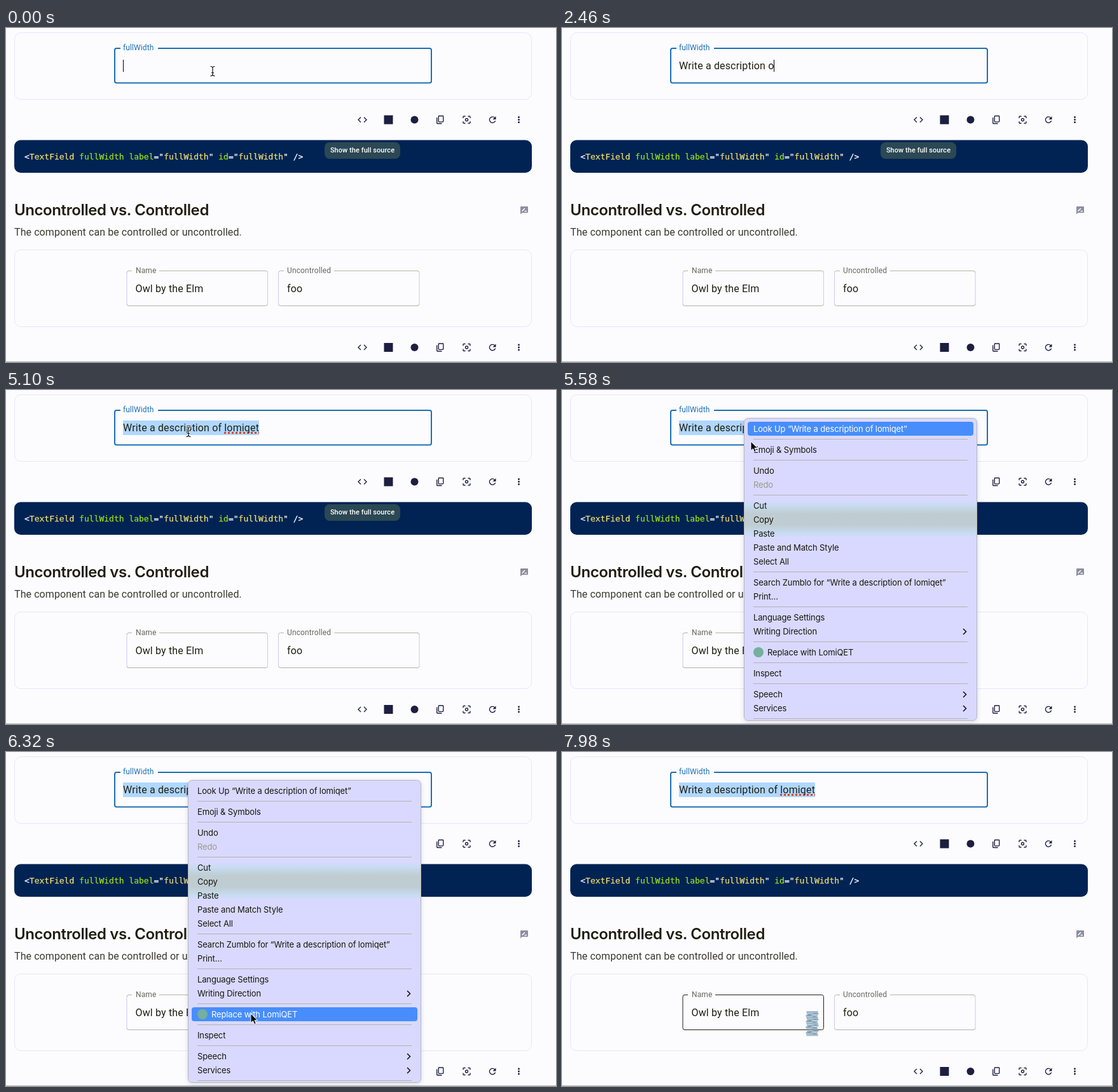
Recreate the animation shown at these times as an HTML page. Size 865 by 526 pixels, loop 8000 ms.

```html
<!DOCTYPE html>
<html lang="en">
<head>
<meta charset="utf-8">
<title>Text field demo</title>
<style>
  html, body { margin: 0; width: 100%; height: 100%; overflow: hidden; background: #fcfcff; }
  body { position: relative; }
  svg { position: absolute; left: 0; top: 0; }
  text { fill: #1f1f10; }
  .body { font: 16px Roboto, sans-serif; letter-spacing: .15px; }
  .intro { letter-spacing: .08px; fill: #3a3a2e; }
  .label { font: 12px Roboto, sans-serif; letter-spacing: .11px; fill: #68685c; }
  .heading { font: 600 24px Inter, sans-serif; letter-spacing: -.4px; }
  .code { font: 13px "DejaVu Sans Mono", monospace; fill: #fff; stroke: #fff; stroke-width: .25px; }
  .tag { fill: #f0e06a; stroke: #f0e06a; }
  .attr { fill: #9be010; stroke: #9be010; }
  .menu text { font: 13px Inter, sans-serif; letter-spacing: -.14px; fill: #16160c; }
  .menu .off { fill: #9a9a8c; }
  .menu .hot { fill: #fff; }
  #input { position: absolute; left: 184px; top: 48px; height: 23px; white-space: pre;
    font: 16px/23px Roboto, sans-serif; letter-spacing: .15px; color: #1f1f10; }
  #input span { display: inline-block; height: 23px; vertical-align: top; }
  #input.picked span { background: #b0d7ff; }
  #input.picked #word { text-decoration: underline dotted #e0402c 2.5px;
    text-underline-offset: 1px; text-decoration-skip-ink: none; }
  #caret { position: absolute; right: -1px; top: 2px; width: 1px; height: 19px; background: #000; }
  #tip { position: absolute; left: 501px; top: 180px; width: 119px; height: 26px; border-radius: 8px;
    background: #2b4854; color: #fff; text-align: center; font: 500 11px/26px Roboto, sans-serif;
    letter-spacing: .05px; }
</style>
</head>
<body>
<svg id="page" width="865" height="526">
  <defs>
    <g id="tools" fill="none" stroke="#1e1e40" stroke-width="1.35">
      <path d="M558 -4l-4 4 4 4M563 -4l4 4-4 4"/>
      <rect x="594.5" y="-7" width="14" height="14" fill="#1e1e40" stroke="none"/>
      <circle cx="642.5" r="6" fill="#1e1e40" stroke="none"/>
      <rect x="680.3" y="-6" width="7.4" height="9.3" rx=".7"/>
      <path d="M677.7 -3.5V5.3q0 .7 .7 .7H685.5"/>
      <circle cx="724.5" r="2"/>
      <path d="M719 -2.5V-4.5q0-1 1-1h2.5M726.5-5.5h2.5q1 0 1 1v2M730 2.5V4.5q0 1-1 1h-2.5M722.5 5.5h-2.5q-1 0-1-1v-2"/>
      <path d="M768.7-3A4.7 4.7 0 1 0 769.6 1.5"/>
      <path d="M770.5-5.5v5h-5z" fill="#1e1e40" stroke="none"/>
      <g fill="#1e1e40" stroke="none">
        <circle cx="806.5" cy="-4" r="1.4"/><circle cx="806.5" r="1.4"/><circle cx="806.5" cy="4" r="1.4"/>
      </g>
    </g>
  </defs>

  <g fill="none" stroke="#e6e4fb">
    <rect x="13.5" y="7.5" width="813" height="105" rx="10"/>
    <rect x="13.5" y="349.5" width="813" height="121" rx="10"/>
  </g>
  <path d="M180 32H174q-3 0-3 3V83.500q0 3 3 3H666q3 0 3-3V35q0-3-3-3H239" fill="none" stroke="#1c6fb4" stroke-width="2"/>
  <text class="label" x="184" y="35" style="fill:#1c6fb4">fullWidth</text>
  <use href="#tools" y="144.5"/>
  <use href="#tools" y="503"/>

  <rect x="13" y="176.5" width="814" height="51.5" rx="10" fill="#002354"/>
  <text class="code" x="29" y="206.5">&lt;<tspan class="tag">TextField</tspan> <tspan class="attr">fullWidth</tspan> <tspan class="attr">label</tspan>="<tspan class="tag">fullWidth</tspan>" <tspan class="attr">id</tspan>="<tspan class="tag">fullWidth</tspan>" /&gt;</text>

  <text class="heading" x="13" y="295">Uncontrolled vs. Controlled</text>
  <path d="M810 281h10q1 0 1 1v8q0 1-1 1h-8.5l-2.5 2.5V282q0-1 1-1z" fill="#8c8ea2"/>
  <path d="M811.5 288.5l4.5-4.5M815.5 288.5h3.5" stroke="#fff" stroke-width="1.5"/>
  <text class="body intro" x="13" y="326.5">The component can be controlled or uncontrolled.</text>

  <g id="fields" fill="none"></g>
  <text class="label" x="204" y="386">Name</text>
  <text class="body" x="203.5" y="416">Owl by the Elm</text>
  <text class="label" x="442" y="386">Uncontrolled</text>
  <text class="body" x="442" y="416">foo</text>
  <g id="torn" fill="none"></g>
  <path d="M0 525.5H865" stroke="#b4b4b8"/>
</svg>

<div id="tip">Show the full source</div>
<div id="input"><span id="lead"></span><span id="word"></span><i id="caret"></i></div>

<svg id="top" width="865" height="526">
  <defs>
    <linearGradient id="band" x2="0" y2="1">
      <stop offset="0" stop-color="#d9d9ff"/>
      <stop offset=".14" stop-color="#c8dcf2"/>
      <stop offset=".36" stop-color="#bfcdd2"/>
      <stop offset=".66" stop-color="#bfcdd2"/>
      <stop offset=".88" stop-color="#c8dcf2"/>
      <stop offset="1" stop-color="#d9d9ff"/>
    </linearGradient>
    <filter id="soft" x="-10%" y="-10%" width="120%" height="120%">
      <feDropShadow dx="0" dy="2" stdDeviation="3" flood-color="#303050" flood-opacity=".16"/>
    </filter>
  </defs>
  <g id="menu" class="menu">
    <rect x="286.5" y="44.5" width="366" height="476" rx="6" fill="#d9d9ff" stroke="#b8b8b8" filter="url(#soft)"/>
    <rect x="287" y="173" width="365" height="60" fill="url(#band)"/>
    <g id="rules" stroke="#b2b2b0"></g>
    <rect id="glow" x="292" width="355" height="22" rx="4" fill="#478efc"/>
    <g id="items"></g>
    <circle cx="309" cy="413" r="8" fill="#74b09c"/>
  </g>
  <path id="arrow" d="M0 0V14.5l3.4-3.1 2.3 5.3 2.5-1.1-2.3-5.1H10.5z" fill="#000" stroke="#fff"/>
  <g id="beam" fill="none">
    <path id="beamShape" d="M-3.5-7.5q3.5 0 3.5 2.5V5q0 2.5-3.5 2.5M3.5-7.5q-3.5 0-3.5 2.5M0 5q0 2.5 3.5 2.5M-2 2.5h4" stroke="#fff" stroke-width="3"/>
    <path d="M-3.5-7.5q3.5 0 3.5 2.5V5q0 2.5-3.5 2.5M3.5-7.5q-3.5 0-3.5 2.5M0 5q0 2.5 3.5 2.5M-2 2.5h4" stroke="#111" stroke-width="1.2"/>
  </g>
</svg>

<script>
const LOOP = 8000, TYPE_START = 340, KEY_TIME = 102;
const SELECT = 4800, MENU_OPEN = 5250, MENU_CLOSE = 6360, TIP_FADE = 6310;
const LEAD = 'Write a description of ', WORD = 'lomiqet', PHRASE = LEAD + WORD;
const typedEnd = TYPE_START + KEY_TIME * (PHRASE.length - 1);

const $ = id => document.getElementById(id);
const show = (id, on) => { $(id).style.visibility = on ? 'visible' : 'hidden'; };
const place = (id, [x, y]) => $(id).setAttribute('transform', `translate(${x} ${y})`);
const add = (parent, name, attrs, text = '') => {
  const el = document.createElementNS('http://www.w3.org/2000/svg', name);
  for (const key in attrs) el.setAttribute(key, attrs[key]);
  el.textContent = text;
  return $(parent).appendChild(el);
};

// Outlined fields: horizontal edges with a label notch, then the paler sides.
function field(x, notchStart, notchEnd) {
  const r = x + 221.5;
  const edges = add('fields', 'path', { stroke: '#b4b4a6',
    d: `M${notchStart} 382.5H${x + 3}q-3 0-3 3M${notchEnd} 382.5H${r - 3}q3 0 3 3M${x} 434.5q0 3 3 3H${r - 3}q3 0 3-3` });
  const sides = add('fields', 'path', { stroke: '#cbc8f0', d: `M${x} 385.5V434.5M${r} 385.5V434.5` });
  return [edges, sides];
}
const nameField = field(190, 198, 241);
field(428.5, 437, 516);

const items = [
  [61, `Look Up “${PHRASE}”`], [94, 'Emoji & Symbols'], [127, 'Undo'], [149, 'Redo', 'off'],
  [182, 'Cut'], [204, 'Copy'], [226, 'Paste'], [248, 'Paste and Match Style'], [270, 'Select All'],
  [303, `Search Zumblo for “${PHRASE}”`], [325, 'Print…'], [358, 'Language Settings'],
  [380, 'Writing Direction', 'sub'], [413, 'Replace with LomiQET'], [446, 'Inspect'],
  [479, 'Speech', 'sub'], [501, 'Services', 'sub']
].map(([y, label, kind = '']) => {
  if (kind === 'sub')
    add('items', 'path', { d: `M631 ${y - 4}l4.5 4.5-4.5 4.5`, fill: 'none', stroke: '#16160c', 'stroke-width': 1.6 });
  const text = add('items', 'text', { x: y === 413 ? 323 : 301, y: y + 5, class: kind }, label);
  return { y, kind, text };
});
for (const y of [77, 110, 165, 286, 341, 396, 429, 462, 517])
  add('rules', 'path', { d: `M301 ${y + .5}H638` });

// Torn pointer left over beside the Name field.
for (let i = 0; i < 13; i++) {
  const y = 409 + i * 3, shift = Math.sin(i * 2.1);
  [['#586070', .7], ['#3a94ea', 1.1], ['#dccb98', .9]].forEach(([stroke, width], k) => add('torn', 'path', {
    stroke, 'stroke-width': width, d: `M${384.5 + shift} ${y + k}q5 ${shift * .8} 9 0t9 0` }));
}

const beamPath = [[0, 325, 68], [4500, 325, 68], [4800, 300, 64], [5100, 287, 66]];
const arrowPath = [[5250, 287, 66], [5520, 292, 70], [5580, 297, 81], [6120, 385, 412]];
function along(path, t) {
  if (t <= path[0][0]) return path[0].slice(1);
  for (let i = 1; i < path.length; i++) {
    const [t0, x0, y0] = path[i - 1], [t1, x1, y1] = path[i];
    if (t > t1) continue;
    const p = (t - t0) / (t1 - t0), e = p * p * (3 - 2 * p);
    return [x0 + (x1 - x0) * e, y0 + (y1 - y0) * e];
  }
  return path[path.length - 1].slice(1);
}

function draw(t) {
  const count = t < TYPE_START ? 0 : Math.min(PHRASE.length, 1 + Math.floor((t - TYPE_START) / KEY_TIME));
  $('lead').textContent = LEAD.slice(0, count);
  $('word').textContent = PHRASE.slice(LEAD.length, count);
  $('input').className = t >= SELECT ? 'picked' : '';
  const blink = t < typedEnd || Math.floor((t - typedEnd) / 500) % 2 === 0;
  show('caret', t < SELECT && blink);

  const menuOpen = t >= MENU_OPEN && t < MENU_CLOSE;
  show('beam', t < TYPE_START || (t >= 4500 && t < MENU_OPEN));
  place('beam', along(beamPath, t));
  show('arrow', menuOpen);
  place('arrow', along(arrowPath, t));

  // The highlight trails the pointer slightly.
  const hoverY = along(arrowPath, t - 60)[1];
  const hot = items.find(item => item.kind !== 'off' && Math.abs(item.y - hoverY) <= 11);
  $('menu').style.display = menuOpen ? '' : 'none';
  $('glow').style.display = hot ? '' : 'none';
  if (hot) $('glow').setAttribute('y', hot.y - 11);
  for (const item of items) item.text.setAttribute('class', item === hot ? 'hot' : item.kind);

  const fade = Math.min(1, Math.max(0, (t - TIP_FADE) / 195));
  $('tip').style.opacity = 1 - fade;
  $('tip').style.transform = `scale(${1 - .04 * fade})`;

  const closed = t >= MENU_CLOSE;
  show('torn', closed);
  nameField[0].setAttribute('stroke', closed ? '#20200f' : '#b4b4a6');
  nameField[1].setAttribute('stroke', closed ? '#20200f' : '#cbc8f0');
}

const start = performance.now();
function tick() {
  draw((performance.now() - start) % LOOP);
  requestAnimationFrame(tick);
}
draw(0);
requestAnimationFrame(tick);
</script>
</body>
</html>
```
